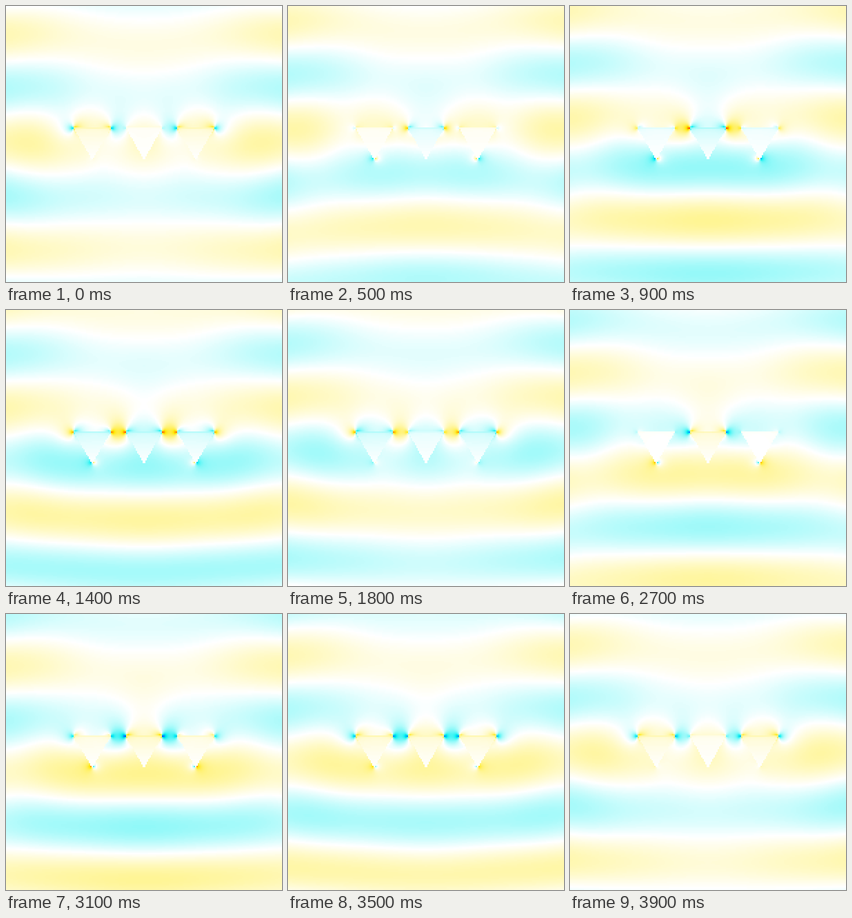
Recreate the animation shown at these times as an HTML page with a canvas. Size 400 px wide and 400 px high, loop 4 s.

```html
<!DOCTYPE html>
<html lang="en">
<head>
<meta charset="utf-8">
<title>Wave scattered by three triangles</title>
<style>
html, body { margin: 0; width: 100%; height: 100%; overflow: hidden; background: #fff; }
canvas { display: block; width: 400px; height: 400px; image-rendering: pixelated; }
</style>
</head>
<body>
<canvas id="view" width="200" height="200"></canvas>
<script>
const N = 200, CELL = 2, LOOP = 4000, STEP = 100;
const K = 2 * Math.PI / 152;   // wave number per px
const TOP = 177, BODY = 192, TIP = 223;
const GAIN = 0.28;

const polar = (r, a) => [r * Math.cos(a), r * Math.sin(a)];
const mul = (a, b) => [a[0] * b[0] - a[1] * b[1], a[0] * b[1] + a[1] * b[0]];
const incident = y => -K * (y - 45);

// Triangles: centre, half width, strength, phase lag of the dipole (deg), sign of the tip charge
const triangles = [
  { x: 125, half: 27, power: 0.5, lag: 100, tip: 1 },
  { x: 200, half: 26, power: 0.65, lag: 50, tip: 0 },
  { x: 275, half: 27, power: 0.5, lag: 100, tip: -1 }
];
for (const t of triangles) {
  const lag = t.lag * Math.PI / 180;
  t.phase = polar(1, incident(TOP) + lag);
  t.bodyPhase = polar(1, incident(BODY) + lag + 0.2);
}
const tipPhase = polar(1, incident(TOP) + 0.7);

// Hankel functions H0 and H1 of the first kind, by power series
function hankel(z) {
  const q = z * z / 4, log = Math.log(z / 2) + 0.5772156649;
  let term = 1, h = 0, j = 1, dj = 0, s = 0, ds = 0;
  for (let m = 1; m < 34; m++) {
    term *= -q / (m * m);
    h += 1 / m;
    j += term;
    dj += 2 * m / z * term;
    s -= h * term;
    ds -= h * 2 * m / z * term;
  }
  const c = 2 / Math.PI;
  return [j, c * (log * j + s), -dj, -c * (j / z + log * dj + ds)];
}

const soft = (dx, dy, s = 2) => Math.sqrt(dx * dx + dy * dy + s);

// Horizontal field of a point charge
function charge(dx, dy) {
  const r = soft(dx, dy), h = hankel(K * r);
  return { r, re: h[2] * dx / r, im: h[3] * dx / r };
}

// Complex field amplitude at a point
function field(x, y) {
  const sum = polar(1, incident(y));
  const local = [0, 0];
  const add = (to, v) => { to[0] += v[0]; to[1] += v[1]; };
  let inside = null;

  for (const t of triangles) {
    const dx = x - t.x, dy = y - TOP, by = y - BODY;
    if (y >= TOP && Math.abs(dx) < t.half * (TIP - y) / (TIP - TOP)) inside = t;

    // current through the body, radiating more strongly upwards
    const body = [0, 0], pts = 6, w = 2 * t.half / pts;
    const aim = 0.85 - 0.15 * by / soft(dx, by, 900);
    for (let i = 0; i < pts; i++) {
      const h = hankel(K * soft(dx + t.half - (i + 0.5) * w, by));
      add(body, [h[0] * K * w * aim, h[1] * K * w * aim]);
    }
    add(sum, mul(mul([0, t.power], t.bodyPhase), body));

    // charges at the top corners
    const ends = [0, 0], near = [0, 0];
    for (const side of [1, -1]) {
      const c = charge(dx - side * t.half, dy);
      const extra = 1.1 * Math.exp(-c.r / 26);
      add(ends, [side * c.re * aim, side * c.im * aim]);
      add(near, [side * c.re * extra, side * c.im * extra]);
    }
    const drive = mul([0, t.power], t.phase);
    add(sum, mul(drive, [ends[0] + near[0], ends[1] + near[1]]));
    add(local, mul(drive, near));

    if (t.tip) {
      const c = charge(dx, y - 221), g = 0.85 * t.tip * Math.exp(-c.r / 13);
      add(sum, mul(mul([0, g], tipPhase), [c.re, c.im]));
    }
  }
  if (!inside) return sum;

  const depth = y - TOP;
  const g = -0.55 * (1 - depth / (TIP - TOP)) - 0.5 * Math.exp(-depth / 1.2);
  return [g * inside.phase[0] + 0.25 * local[0], g * inside.phase[1] + 0.25 * local[1]];
}

const re = new Float32Array(N * N), im = new Float32Array(N * N);
for (let j = 0; j < N; j++) {
  for (let i = 0; i < N / 2; i++) {
    const f = field(CELL * i + 1, CELL * j + 1);
    for (const k of [j * N + i, j * N + N - 1 - i]) {
      re[k] = f[0];
      im[k] = f[1];
    }
  }
}

// Colour scale: white to yellow to red, white to cyan to blue
const warm = [[255, 255, 255], [255, 230, 0], [255, 40, 0], [130, 0, 0]];
const cold = [[255, 255, 255], [0, 240, 240], [0, 70, 255], [0, 0, 130]];
const SHADES = 300;
const ramp = stops => Array.from({ length: SHADES }, (_, n) => {
  const i = Math.floor(n / 100), f = n / 100 - i;
  return stops[i].map((c, k) => Math.round(c + (stops[i + 1][k] - c) * f));
});
const warmRamp = ramp(warm), coldRamp = ramp(cold);

const ctx = document.getElementById("view").getContext("2d");
const img = ctx.createImageData(N, N);
img.data.fill(255);

function draw(time) {
  const a = 2 * Math.PI * time / LOOP, c = Math.cos(a), s = Math.sin(a);
  for (let k = 0; k < N * N; k++) {
    const v = re[k] * c + im[k] * s;
    const n = Math.min(SHADES - 1, Math.round(Math.abs(v) * GAIN * 100));
    const rgb = (v > 0 ? warmRamp : coldRamp)[n];
    img.data[4 * k] = rgb[0];
    img.data[4 * k + 1] = rgb[1];
    img.data[4 * k + 2] = rgb[2];
  }
  ctx.putImageData(img, 0, 0);
}

let shown = 0;
draw(0);
function tick() {
  const time = Math.floor(performance.now() % LOOP / STEP) * STEP;
  if (time !== shown) draw(shown = time);
  requestAnimationFrame(tick);
}
requestAnimationFrame(tick);
</script>
</body>
</html>
```
